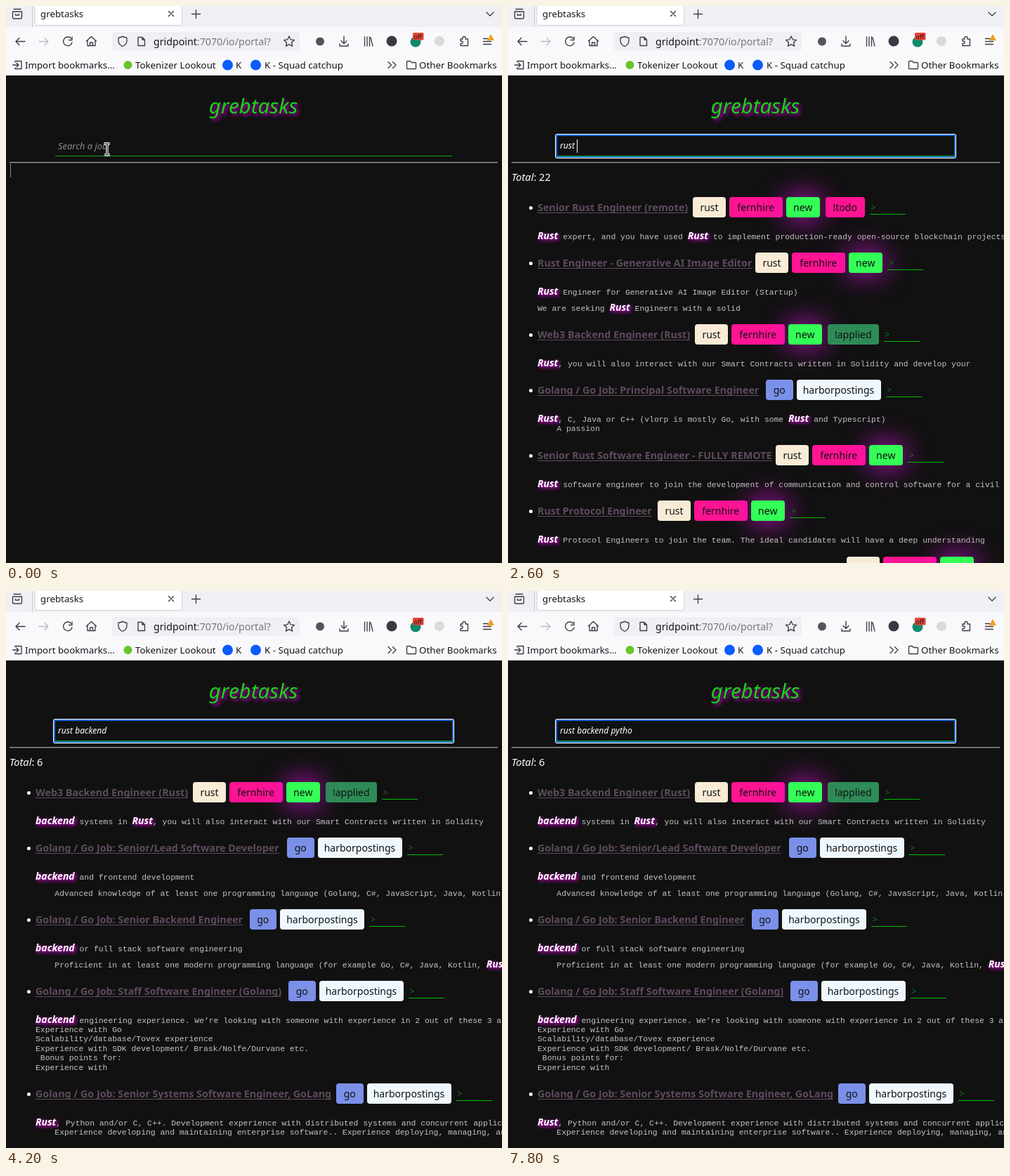
These frames come from a looping animation (706x793 px, 8000 ms). An HTML page:

```html
<!DOCTYPE html>
<html lang="en">
<head>
<meta charset="utf-8">
<title>grebtasks</title>
<style>
html, body { margin: 0; width: 100%; height: 100%; overflow: hidden; background: #111; }
#stage { position: relative; width: 706px; height: 793px; overflow: hidden; background: #111;
  color: #fff; font: 14px/24px "Noto Sans", sans-serif; }
#stage div, #stage > svg { position: absolute; white-space: pre; }
#chrome { left: 0; top: 0; }
#chrome text { font: 13.3px "Noto Sans", sans-serif; fill: #15141a; }
.ico { fill: none; stroke: #3d3c44; stroke-width: 1.35; stroke-linecap: round; stroke-linejoin: round; }
#logo { left: 0; width: 704px; top: 122px; text-align: center; font-size: 29.5px; line-height: 39px;
  font-style: italic; font-weight: 300; color: #14d814; text-shadow: 3px 3px 5px #b0b; }
#rule { left: 5px; top: 222px; width: 695px; height: 1px; background: #9a9a9a; border-bottom: 1px solid #444; }
#edge { left: 6px; top: 224px; width: 1px; height: 20px; background: #8a8a8a; }
#line { left: 70px; top: 213px; width: 565px; height: 1px; background: #0fa80f; }
#ring { left: 67px; top: 182px; width: 565px; height: 29px; border: 2px solid #1f6fe0; margin: 1px;
  border-radius: 2px; box-shadow: 0 0 0 1px #fff; }
#hint, #field { left: 74px; top: 187px; font-size: 12.1px; font-style: italic; }
#stage #hint { font-size: 12.9px; color: #8b8b8b; }
#caret { position: absolute; left: 100%; top: 3px; width: 1px; height: 19px; background: #fff; }
#mouse { left: 136px; top: 193px; }
.total { left: 5px; top: 231px; font-size: 14.6px; }
.dot { left: 29.5px; width: 5.5px; height: 5.5px; border-radius: 50%; background: #fff; }
.job { left: 42px; font-size: 14.3px; font-weight: 700; color: #5d4b5e;
  text-decoration: underline; text-decoration-thickness: 1px; text-underline-offset: 2px; text-decoration-skip-ink: none; }
#stage .tags { display: flex; gap: 5px; }
.tags span { height: 29px; line-height: 29px; border-radius: 4px; text-align: center; color: #111; }
.tags .note { box-sizing: border-box; width: 51px; height: 25px; margin-left: 2px; padding-left: 2px; line-height: 30px;
  border-bottom: 1px solid #0b0; border-radius: 0; text-align: left; font-size: 12px; color: #167a16; }
.desc { left: 42px; font: 11.38px/24px "Liberation Mono", monospace; color: #c4c4c4; }
.desc b { font: italic 700 14px/0 "Noto Sans", sans-serif; color: #fff; text-shadow: 2px 2px 5px #f0f; }
</style>
</head>
<body>
<div id="stage">
  <div id="logo">grebtasks</div>
  <div id="line"></div>
  <div id="ring"></div>
  <div id="hint">Search a job</div>
  <div id="field"><span id="query"></span><span id="caret"></span></div>
  <div id="rule"></div>
  <div id="edge"></div>
  <div id="lists"></div>
  <svg id="mouse" width="16" height="22" fill="none">
    <path d="M4 3H7L8 4L9 3H12M8 4V18M4 19H7L8 18L9 19H12" stroke="#fff" stroke-width="3.4"/>
    <path d="M4 3H7L8 4L9 3H12M8 4V18M4 19H7L8 18L9 19H12" stroke="#222" stroke-width="1.2"/>
  </svg>
  <svg id="chrome" width="706" height="99">
    <rect width="706" height="99" fill="#f9f9fb"/>
    <rect width="706" height="30" fill="#f0f0f4"/>
    <path d="M37.500 0V30" stroke="#c9c9d0"/>
    <path d="M41 -2H250.500V23Q250.500 27.500 246 27.500H45.500Q41 27.500 41 23Z" fill="#fff" stroke="#d2d2d8"/>
    <path d="M0 98.500H706" stroke="#d4d4da"/>
    <rect x="151" y="37" width="267" height="27" rx="4" fill="#f0f0f4"/>
    <g class="ico">
      <path d="M11 4.500H21M9.500 8H22.500V16Q22.500 18 20.500 18H11.500Q9.500 18 9.500 16ZM13.500 11.500V13H18.500V11.500"/>
      <path d="M231.500 7.500L238.500 14.500M238.500 7.500L231.500 14.500M264.500 11.500H276.500M270.500 5.500V17.500M684 9L689 14L694 9"/>
      <path d="M27 50.500H14M19 45.500L14 50.500L19 55.500"/>
      <path d="M47 50.500H60M55 45.500L60 50.500L55 55.500" stroke="#bbbbc2"/>
      <path d="M92.500 46A6.300 6.300 0 1 0 94 52M94 44V48.500H89.500"/>
      <path d="M114.500 50L121.500 43.500L128.500 50M116 49V56.500H127V49M119.500 56.500V52H123.500V56.500"/>
      <path d="M166 43.500L172 45.500V50Q171.500 55 166 57.500Q160.500 55 160 50V45.500Z"/>
      <path d="M188 44.500H194L197.500 48V56.500H188ZM194 44.500V48H197.500"/>
      <path d="M403 43L405.200 47.800L410.400 48.400L406.500 52L407.600 57.200L403 54.600L398.400 57.200L399.500 52L395.600 48.400L400.800 47.800Z"/>
      <path d="M481 43V53M477 49.500L481 53.500L485 49.500M475 54V57H487V54"/>
      <path d="M510.500 44V57M514 44V57M517.500 44V57M519 45L522 57"/>
      <path d="M647 47H650V45.500A2 2 0 0 1 654 45.500V47H657.500V56.500H647V53.500H648.500A1.700 1.700 0 0 0 648.500 50H647Z"/>
      <path d="M679.500 46.500H686M679.500 50.500H690.500M679.500 54.500H690.500"/>
      <path d="M13 79.500V78.500H22V89.500H13V88M9.500 84H18M15 81L18 84L15 87"/>
      <path d="M544 79.500L548.500 84L544 88.500M550.500 79.500L555 84L550.500 88.500"/>
      <path d="M570.500 79.500Q570.500 78.500 571.500 78.500H575.500L577.500 80.500H582.500Q583.500 80.500 583.500 81.500V88.500Q583.500 89.500 582.500 89.500H571.500Q570.500 89.500 570.500 88.500Z"/>
    </g>
    <path d="M690 40L695 49H685Z" fill="#f2a01e"/>
    <circle cx="447" cy="50.500" r="6" fill="#55545c"/>
    <circle cx="549" cy="50" r="7.500" fill="#3a3a44"/>
    <circle cx="583" cy="51" r="7.500" fill="#0d8a6c"/>
    <circle cx="617" cy="50" r="7" fill="#dadadd"/>
    <rect x="579" y="38" width="15.500" height="10.500" rx="1.500" fill="#ea4335"/>
    <text x="580.500" y="46.500" style="font-size:9px">off</text>
    <circle cx="173.500" cy="84" r="6" fill="#67c52a"/>
    <circle cx="315.500" cy="84" r="7.500" fill="#0b5cff"/>
    <circle cx="355.500" cy="84" r="7.500" fill="#0b5cff"/>
    <text x="49" y="16">grebtasks</text>
    <text x="210" y="55.500" style="font-size:14.200px">gridpoint<tspan fill="#77767e">:7070/io/portal?</tspan></text>
    <text x="27" y="89">Import bookmarks…</text>
    <text x="184" y="89">Tokenizer Lookout</text>
    <text x="327" y="89">K</text>
    <text x="368" y="89">K - Squad catchup</text>
    <text x="588" y="89">Other Bookmarks</text>
  </svg>
</div>
<script>
const $ = id => document.getElementById(id);

// label: [width, background, extra style]
const TAGS = {
  rust: [47, '#faebd7'],
  fernhire: [75.5, '#ff1493'],
  new: [48.5, '#33ff57', 'box-shadow:0 0 38px #e010e0'],
  '!todo': [55.5, '#ff1493', 'margin-left:3px'],
  '!applied': [72.5, '#2e8b57', 'margin-left:3px'],
  go: [38.5, '#7b90e8'],
  harborpostings: [120, '#f0f8ff']
};

const tag = name => {
  const [w, bg, extra = ''] = TAGS[name];
  return `<span style="width:${w}px;background:${bg};${extra}">${name}</span>`;
};
const mark = s => s.replace(/\*(.+?)\*/g, '<b>$1</b>');
const at = (cls, top, html = '', left) =>
  `<div class="${cls}" style="top:${top}px${left ? `;left:${left}px` : ''}">${html}</div>`;

function job(y, title, tagX, tags, lines, step = 13.4) {
  return at('dot', y - 2.5) + at('job', y - 12, title) +
    at('tags', y - 15, tags.split(' ').map(tag).join('') + '<span class="note">&gt;</span>', tagX) +
    lines.map((s, i) => at('desc', y + 29.5 + i * step, mark(s))).join('');
}
const list = (total, ...jobs) => at('total', 231, `<i>Total</i>: ${total}`) + jobs.join('');

const RUST = 'rust fernhire new', GO = 'go harborpostings', GOJOB = 'Golang / Go Job: ';
const systems = y => [y, GOJOB + 'Senior Systems Software Engineer, GoLang', 470, GO];

const lists = [
  list(4,
    job(287, 'Senior Rust Engineer (remote)', 263, RUST + ' !todo', ['*R* or similar tools for data analysis are a plus']),
    job(366, 'Rust Protocol Engineer', 213, RUST, ['*R*, Python or another language for research work']),
    job(445, GOJOB + 'Senior Backend Engineer', 346.5, GO, ['*R* and SQL knowledge is nice to have']),
    job(...systems(524), ['*R*, Python and/or C, C++. Development experience with', '    distributed systems'])),
  list(22,
    job(287, 'Senior Rust Engineer (remote)', 263, RUST + ' !todo',
      ['*Rust* expert, and you have used *Rust* to implement production-ready open-source blockchain projects']),
    job(366, 'Rust Engineer - Generative AI Image Editor', 352, RUST,
      ['*Rust* Engineer for Generative AI Image Editor (Startup)', 'We are seeking *Rust* Engineers with a solid'], 23),
    job(468, 'Web3 Backend Engineer (Rust)', 266, RUST + ' !applied',
      ['*Rust*, you will also interact with our Smart Contracts written in Solidity and develop your']),
    job(547, GOJOB + 'Principal Software Engineer', 367, GO,
      ['*Rust*, C, Java or C++ (vlorp is mostly Go, with some *Rust* and Typescript)', '    A passion']),
    job(640, 'Senior Rust Software Engineer - FULLY REMOTE', 381, RUST,
      ['*Rust* software engineer to join the development of communication and control software for a civil']),
    job(719, 'Rust Protocol Engineer', 213, RUST,
      ['*Rust* Protocol Engineers to join the team. The ideal candidates will have a deep understanding']),
    job(798.5, '', 482, RUST, [])),
  list(6,
    job(287, 'Web3 Backend Engineer (Rust)', 266, RUST + ' !applied',
      ['*backend* systems in *Rust*, you will also interact with our Smart Contracts written in Solidity']),
    job(366, GOJOB + 'Senior/Lead Software Developer', 400, GO,
      ['*backend* and frontend development',
       '    Advanced knowledge of at least one programming language (Golang, C#, JavaScript, Java, Kotlin,'], 23),
    job(468, GOJOB + 'Senior Backend Engineer', 346.5, GO,
      ['*backend* or full stack software engineering',
       '    Proficient in at least one modern programming language (for example Go, C#, Java, Kotlin, *Rust*'], 23),
    job(570, GOJOB + 'Staff Software Engineer (Golang)', 402, GO,
      ['*backend* engineering experience. We’re looking with someone with experience in 2 out of these 3 areas',
       'Experience with Go', 'Scalability/database/Tovex experience',
       'Experience with SDK development/ Brask/Nolfe/Durvane etc.', ' Bonus points for:', 'Experience with']),
    job(...systems(716),
      ['*Rust*, Python and/or C, C++. Development experience with distributed systems and concurrent applications',
       '    Experience developing and maintaining enterprise software.. Experience deploying, managing, and']))
];
$('lists').innerHTML = lists.map(html => `<div class="list">${html}</div>`).join('');
const panels = document.querySelectorAll('.list');

// [start ms, typed text with | as caret, visible list or 0]
const base = 'rust backend ';
const typed = (start, head, tail, shown) =>
  [...tail].map((_, i) => [start + i * 100, head + tail.slice(0, i + 1) + '|', shown]);
const steps = [
  [0, '', 0], [1500, 'r|', 0], [1700, 'r', 1], [2200, 'ru|', 1],
  [2400, 'rus|', 0],
  ...typed(2500, 'rus', 't bac', 2),
  [3000, 'rust back|', 0],
  [3200, 'rust backe|', 0], [3300, 'rust backen|', 0], [3400, 'rust backend|', 0],
  [3500, base + '|', 0], [3700, base + '|', 3], [4200, base, 3],
  [4700, base + 'p|', 3],
  ...typed(4900, base + 'p', 'yth', 3),
  ...typed(5300, base + 'pyth', 'on   ', 3),
  [6600, base + 'python   ', 3],
  [6900, base + '|', 3], [7000, base + '|', 0], [7100, base + '|', 3],
  [7300, base + 'p|', 3],
  ...typed(7500, base + 'p', 'yt', 3),
  [7800, base + 'pytho', 3]
];

const show = (el, on) => { el.style.visibility = on ? 'visible' : 'hidden'; };

function draw(now) {
  const t = now % 8000;
  const [, text, shown] = steps.findLast(s => s[0] <= t);
  $('query').textContent = text.replace('|', '');
  show($('caret'), text.endsWith('|'));
  show($('hint'), t < 1500);
  show($('mouse'), t < 1500);
  show($('edge'), t < 500);
  show($('ring'), t >= 500);
  panels.forEach((p, i) => show(p, i + 1 === shown));
}

const origin = performance.now();
function tick() {
  draw(performance.now() - origin);
  requestAnimationFrame(tick);
}
tick();
</script>
</body>
</html>
```
